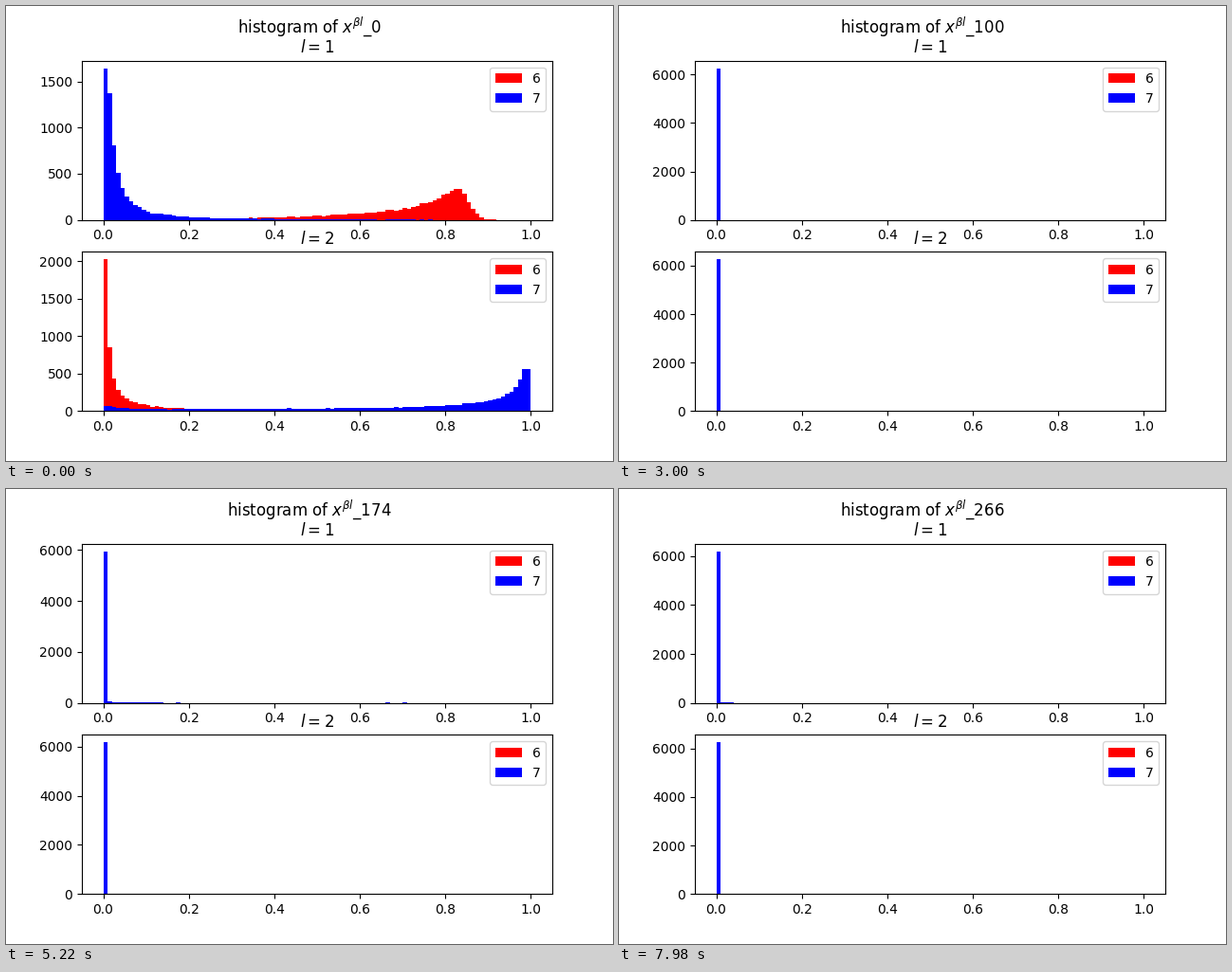
A matplotlib script for the animation above (8000 ms loop, 640 by 480 pixels).

```python
import numpy as np
import matplotlib.pyplot as plt
from matplotlib.animation import FuncAnimation
from matplotlib.patches import Patch

STEPS, LOOP_MS = 267, 8000
BINS = 100
EDGES = np.linspace(0, 1, BINS + 1)
TOTAL = {"6": 5918, "7": 6265}
COLORS = {"6": "red", "7": "blue"}
K = np.arange(BINS)

# Shape of a leak out of the first bin: mostly near zero, thin further out
SPREAD = np.r_[0, np.arange(1, BINS) ** -1.1]
SPREAD *= 0.95 / SPREAD.sum()

# Leak sizes over time, one (steps, samples) pair per panel
LEAK = [([100, 152, 196, 236, 266], [0, 269, 350, 12, 58]),
        ([104, 152, 196, 236, 266], [0, 139, 39, 20, 5])]


def glide(n, steps, values):
    """Eased path through a few key points."""
    i = int(np.clip(np.searchsorted(steps, n) - 1, 0, len(steps) - 2))
    t = np.clip((n - steps[i]) / (steps[i + 1] - steps[i]), 0, 1)
    return values[i] + (values[i + 1] - values[i]) * t * t * (3 - 2 * t)


def bump(n, center, width):
    return np.exp(-((n - center) / width) ** 2)


def start_curves():
    """Expected counts per bin at the first step, for both panels."""
    ridge = 32.5 * K / np.maximum(90 - K, 3) * 1.111 / (1 + np.exp(K - 84.3))
    fall = 1646 / (1 + 0.56 * np.maximum(K - 0.5, 0) ** 1.52)
    fall *= np.clip((95 - K) / 60, 0, 1)
    spike = 880 * np.maximum(K, 1) ** -0.95 * np.exp(-K / 35)
    spike[0] = 2061
    climb = np.minimum(1482 / (100.6 - K), 555) + 50 / (1 + K / 4)
    return [{"6": ridge, "7": fall}, {"6": spike, "7": climb}]


def logits(curve, rng):
    """Samples, as logits, whose histogram follows the curve."""
    noise = rng.normal(size=BINS) * 0.6 * np.sqrt(curve) * (curve < 300)
    counts = np.maximum(np.round(curve + noise), 0).astype(int)
    k = np.repeat(K, counts)
    x = np.clip((k + rng.random(k.size)) / BINS, 1e-4, 0.995)
    return np.log(x / (1 - x))


rng = np.random.default_rng(7)
SAMPLES = [{d: logits(c, rng) for d, c in panel.items()}
           for panel in start_curves()]


def settle(panel, digit, n):
    """Samples slide towards zero during the first steps."""
    z = SAMPLES[panel][digit]
    x = 1 / (1 + np.exp(12 * (min(n, 60) / 27) ** 1.3 - z))
    counts = np.histogram(x, EDGES)[0].astype(float)
    counts[0] += (TOTAL[digit] - z.size) * min(n / 27, 1)
    return counts


def blue_tail(panel, n):
    leak = glide(n, *LEAK[panel])
    tail = np.floor(leak * SPREAD + 0.2)
    if panel == 0:
        tail[1] += 12 * bump(n, 40, 20)
        r = np.random.default_rng(n // 3)
        strays = 4 + 80 * r.random(int(leak / 60)) ** 1.5
        tail[strays.astype(int)] += 5
    tail[0] = -leak
    return tail


def red_tail(n):
    tail = np.zeros(BINS)
    left = 95 * min(n / 12, 1) * bump(max(n, 40), 40, 40)
    tail[1:14] = left / np.arange(1, 14)
    tail[97:] = 50 * bump(n, 36, 30)
    tail[0] = -tail.sum()
    return tail


def histogram(panel, digit, n):
    counts = settle(panel, digit, n)
    if digit == "7":
        counts += blue_tail(panel, n)
    elif panel == 1:
        counts += red_tail(n)
    return counts


fig, axes = plt.subplots(2, 1, figsize=(6.4, 4.8), dpi=100)
title = fig.suptitle("")
bars = []
for i, ax in enumerate(axes):
    ax.set_title(f"$l={i + 1}$")
    bars.append({d: ax.stairs(np.zeros(BINS), EDGES, fill=True, color=c)
                 for d, c in COLORS.items()})
    ax.set_xlim(-0.05, 1.05)
    ax.legend(handles=[Patch(facecolor=c, linewidth=0, label=d)
                       for d, c in COLORS.items()], loc="upper right")


def draw(n):
    title.set_text(rf"histogram of $x^{{\beta l}}$_{n}")
    for i, ax in enumerate(axes):
        peak = 0
        for digit, patch in bars[i].items():
            counts = histogram(i, digit, n)
            patch.set_data(values=counts)
            peak = max(peak, counts.max())
        ax.set_ylim(0, 1.05 * peak)
    return []


anim = FuncAnimation(fig, draw, frames=STEPS, interval=LOOP_MS / STEPS,
                     repeat=True, repeat_delay=0, cache_frame_data=False)
plt.show()
```
